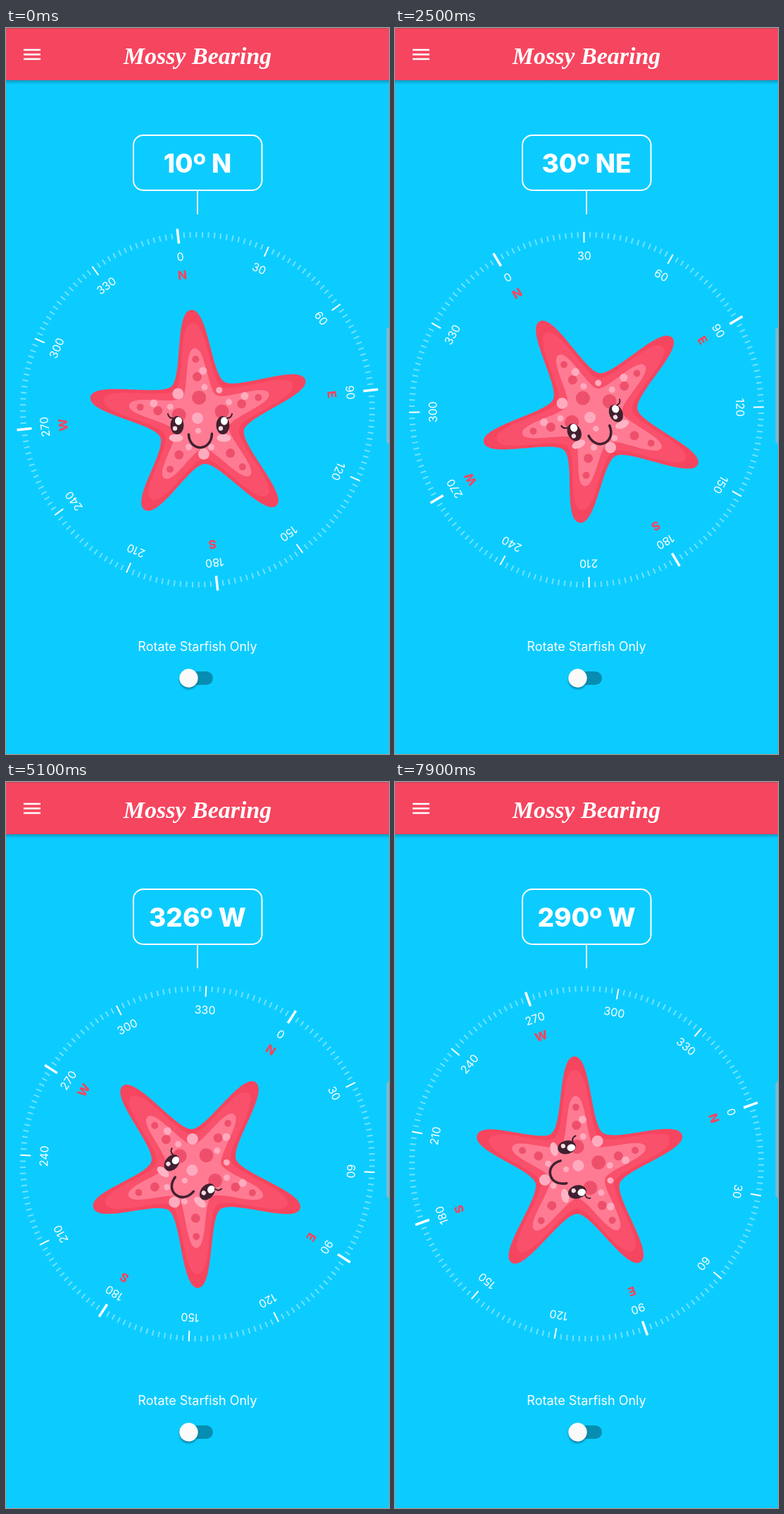
Recreate the animation shown at these times as an HTML page. Size 544x1029 px, loop 8000 ms.

```html
<!DOCTYPE html>
<html lang="en">
<head>
<meta charset="utf-8">
<title>Mossy Bearing</title>
<style>
  html, body { margin: 0; width: 100%; height: 100%; overflow: hidden; background: #0cccff; }
  svg { display: block; width: 100vw; height: 100vh; }
  text { font-family: Inter, sans-serif; fill: #fff; text-anchor: middle; }
  .title { font: italic 700 34px "Liberation Serif", serif; }
  .heading { font-size: 37px; font-weight: 800; }
  .caption { font-size: 18px; }
  .num { font-size: 16px; }
  .point { font-size: 17px; font-weight: 800; fill: #f6455f; }
  .line { fill: none; stroke: #fff; stroke-width: 2; }
  .ink { fill: none; stroke: #402030; stroke-linecap: round; }
</style>
</head>
<body>
<svg viewBox="0 0 544 1029">
  <defs>
    <linearGradient id="shade" x2="0" y2="1">
      <stop stop-color="#075a70" stop-opacity=".5"/>
      <stop offset="1" stop-color="#075a70" stop-opacity="0"/>
    </linearGradient>
    <filter id="soft" x="-50%" y="-50%" width="200%" height="200%"><feGaussianBlur stdDeviation="1.6"/></filter>
  </defs>
  <rect width="544" height="1029" fill="#0cccff"/>
  <rect y="73" width="544" height="7" fill="url(#shade)"/>
  <rect width="544" height="74" fill="#f6455f"/>
  <rect width="544" height="1" fill="#b9475c"/>
  <path d="M25 31H49M25 37.5H49M25 44H49" stroke="#fff" stroke-width="2.6"/>
  <text class="title" x="272" y="51">Mossy Bearing</text>

  <rect class="line" x="181" y="152" width="182.5" height="78" rx="14"/>
  <path class="line" d="M272 230V264"/>
  <text class="heading" id="heading" x="272" y="204.5"></text>

  <g id="dial"></g>
  <g id="star"></g>

  <text class="caption" x="272" y="883">Rotate Starfish Only</text>
  <rect x="247" y="912" width="47" height="19" rx="9.5" fill="#088db2"/>
  <circle cx="259.5" cy="924" r="13" fill="#064f66" opacity=".6" filter="url(#soft)"/>
  <circle cx="259.5" cy="921.5" r="13.2" fill="#fafafa"/>
  <rect x="540.5" y="425" width="8" height="164" rx="3" fill="#74bdd8"/>
</svg>
<script>
const $ = id => document.getElementById(id);
const CX = 272, CY = 541, LOOP = 8000, STEP = 100, LEAD = 0.04, STAR_OFFSET = 6.4;
const DARK = '#ee506b', LIGHT = '#ffabbf', INK = '#402030';

function add(parent, tag, attrs, label = '') {
  const el = document.createElementNS('http://www.w3.org/2000/svg', tag);
  for (const key in attrs) el.setAttribute(key, attrs[key]);
  el.textContent = label;
  return parent.appendChild(el);
}

function buildDial() {
  const dial = $('dial');
  for (let deg = 0; deg < 360; deg += 2) {
    const main = deg % 90 === 0, mid = deg % 30 === 0;
    const g = add(dial, 'g', { transform: `rotate(${deg} ${CX} ${CY})` });
    add(g, 'path', {
      d: `M${CX} ${CY - (main ? 258 : 252)}V${CY - (mid ? 237 : 244)}`,
      stroke: '#fff', 'stroke-width': main ? 3.5 : 2, opacity: mid ? 1 : .42
    });
    if (mid) add(g, 'text', { class: 'num', x: CX, y: CY - 212.5 }, deg);
    if (main) add(g, 'text', { class: 'point', x: CX, y: CY - 186 }, 'NESW'[deg / 90]);
  }
}

// Starfish: arm tips clockwise from the top, everything else follows from them
const star = $('star');
const SX = 277, SY = 555, VALLEY = 63;
const TIPS = [[263, 399.5], [425, 498], [384, 677], [197, 683], [120, 523]];
const ARMS = TIPS.map(([x, y]) => ({ angle: Math.atan2(x - SX, SY - y), length: Math.hypot(x - SX, y - SY) }));

// Point at a distance along a direction, shifted clockwise by side
function polar(angle, dist, side = 0) {
  const s = Math.sin(angle), c = Math.cos(angle);
  return [SX + dist * s + side * c, SY - dist * c + side * s];
}

function valleyAngle(i) {
  const a = ARMS[i].angle, b = ARMS[(i + 1) % 5].angle;
  return a + (b - a + 2 * Math.PI) % (2 * Math.PI) / 2;
}

function starPath() {
  let d = 'M' + polar(valleyAngle(4), VALLEY);
  ARMS.forEach(({ angle, length }, i) => {
    const before = valleyAngle((i + 4) % 5), after = valleyAngle(i);
    d += 'C' + [polar(before, VALLEY, 22), polar(angle, length, -24), polar(angle, length),
      polar(angle, length, 24), polar(after, VALLEY, -22), polar(after, VALLEY)].join(' ');
  });
  return d + 'Z';
}

function dot([cx, cy], r, fill) {
  add(star, 'circle', { cx, cy, r, fill });
}

function oval(cx, cy, rx, ry, fill) {
  add(star, 'ellipse', { cx, cy, rx, ry, fill });
}

function buildBody() {
  const d = starPath();
  [['#f6455f', 1], ['#f9506b', .88], ['#ff7b93', .65]].forEach(([fill, k]) =>
    add(star, 'path', { d, fill, transform: `translate(${SX} ${SY}) scale(${k}) translate(${-SX} ${-SY})` }));
}

function buildDots() {
  ARMS.forEach(({ angle, length }, i) => {
    const along = (k, side) => polar(angle, k * length, side);
    dot(along(.55), 5, DARK);
    dot(along(.39), 6.5, DARK);
    if (Math.cos(angle) > 0) {
      const side = i === 1 ? -9 : 9;
      dot(along(.2), 10, DARK);
      dot(along(.44, side), 5.5, LIGHT);
      dot(along(.29, side), 4.5, LIGHT);
    }
    if (i % 2 === 0) dot(polar(valleyAngle(i), 49), i ? 8 : 4.5, LIGHT);
  });
  dot([272, 553], 8, LIGHT);
  dot([273, 571], 4, LIGHT);
}

function buildFace() {
  const mid = 275.5;
  for (const s of [-1, 1]) {
    const x = mid + s * 32.5;
    dot([mid + s * 16, 594], 4.5, LIGHT);
    oval(mid + s * 34, 581, 10, 5.5, '#ffb4c5');
    oval(x, 563, 9.5, 13, INK);
    oval(x + 2, 557, 5, 5.8, '#fff');
    oval(x - 3, 567.5, 3.2, 3.2, '#f3dbe3');
    add(star, 'path', { class: 'ink', 'stroke-width': 2, d: `M${x + s * 6} 553q${s * 6} 0 ${s * 7} -6` });
  }
  add(star, 'path', { class: 'ink', 'stroke-width': 3.5, d: `M${mid - 16} 576c1 25 32 25 33 -1` });
}

buildDial();
buildBody();
buildDots();
buildFace();

// Dial poses: time in s, angle in degrees
const POSES = [[0, -6.4], [1.6, -49.3], [3.1, -14.3], [4.4, 7.5], [5.1, 32.8], [6.2, 71.6], [7.9, 70.4]];
const LAST = POSES.length - 1;

const chord = i => (POSES[i + 1][1] - POSES[i][1]) / (POSES[i + 1][0] - POSES[i][0]);

// Fast start, rest at turning points, harmonic mean elsewhere
function speed(i) {
  if (i === 0) return 3 * chord(0);
  if (i === LAST) return 0;
  const a = chord(i - 1), b = chord(i);
  return a * b > 0 ? 2 * a * b / (a + b) : 0;
}

function angleAt(t) {
  let i = 0;
  while (i < LAST - 1 && t >= POSES[i + 1][0]) i++;
  const [t0, a0] = POSES[i], [t1, a1] = POSES[i + 1];
  const h = t1 - t0, u = Math.min(1, (t - t0) / h), w = 1 - u;
  return w * w * ((1 + 2 * u) * a0 + u * h * speed(i)) + u * u * ((3 - 2 * u) * a1 - w * h * speed(i + 1));
}

function compassPoint(deg) {
  if (deg > 337 || deg < 23) return 'N';
  return deg < 68 ? 'NE' : 'W';
}

const start = performance.now();
function draw() {
  const t = Math.floor((performance.now() - start) % LOOP / STEP) * STEP / 1000;
  const angle = angleAt(t);
  const deg = (Math.round(-angleAt(t + LEAD)) + 360) % 360;
  $('dial').setAttribute('transform', `rotate(${angle} ${CX} ${CY})`);
  star.setAttribute('transform', `rotate(${angle + STAR_OFFSET} ${CX} ${CY})`);
  $('heading').textContent = `${deg}º ${compassPoint(deg)}`;
  requestAnimationFrame(draw);
}
draw();
</script>
</body>
</html>
```
